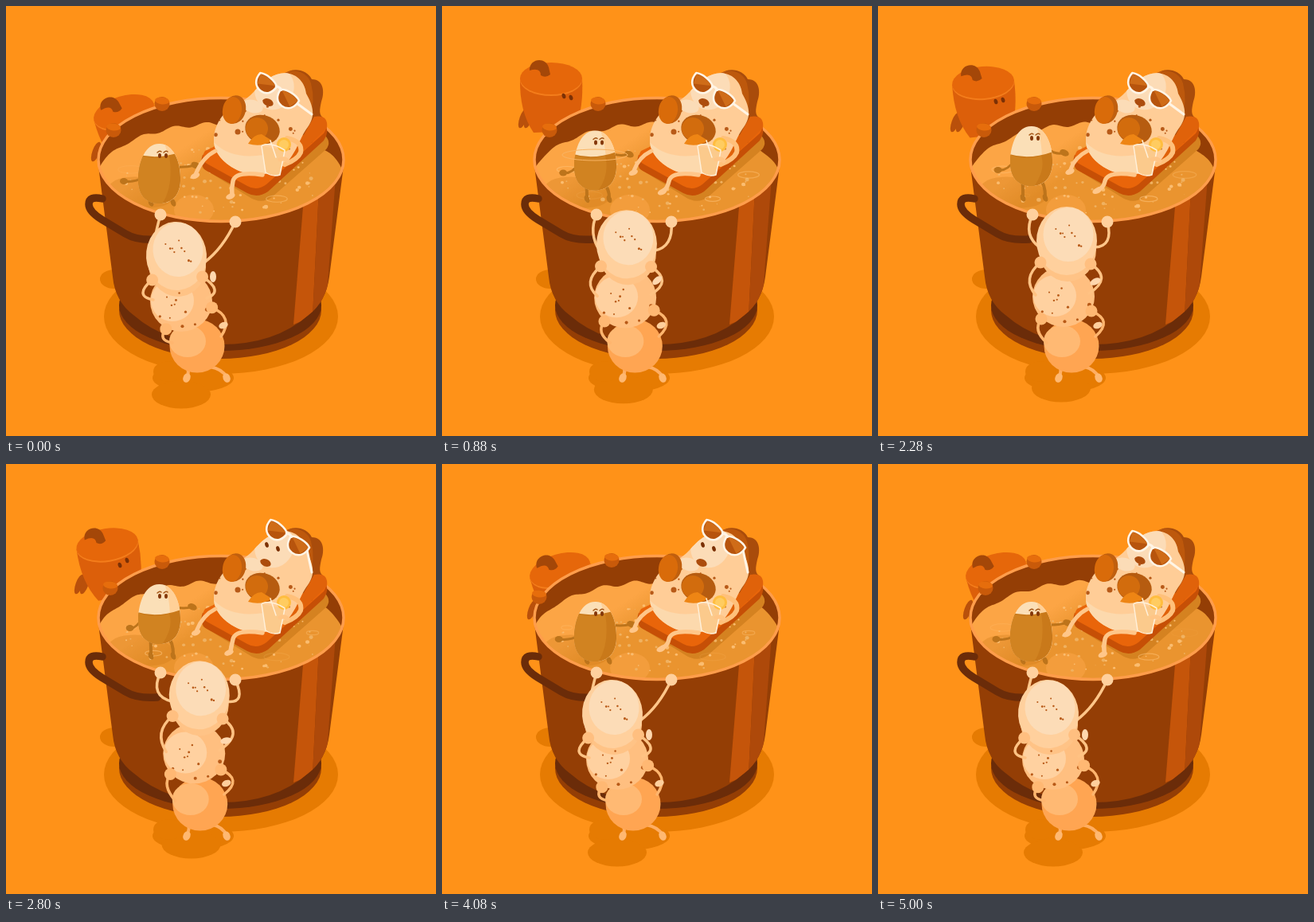
These frames come from a looping animation (540 px wide and 540 px high, 5040 ms). An HTML page with a canvas:

```html
<!DOCTYPE html>
<html>
<head>
<meta charset="utf-8">
<style>
html, body { margin: 0; width: 100%; height: 100%; overflow: hidden; background: #ff9218; }
canvas { display: block; width: 540px; height: 540px; }
</style>
</head>
<body>
<canvas id="stage" width="540" height="540"></canvas>
<script>
const ctx = document.getElementById('stage').getContext('2d');
const LOOP = 5040, STEP = 40, TAU = Math.PI * 2;
const FLOOR = '#ff9218', SHADOW = '#e67b02', WALL = '#943e05', DARK = '#6b2c09';
const CREAM = '#fcdcb7', SKIN = '#ffcd97', LIMB = '#ffc689', INK = '#7b3005', WHITE = '#fff5e6';

const mix = (a, b, k) => a + (b - a) * k;

// Smooth 0 to 1 between two times
function ramp(t, from, to) {
  const k = Math.min(1, Math.max(0, (t - from) / (to - from)));
  return k * k * (3 - 2 * k);
}

function seeded(seed) {
  return () => (seed = (seed * 16807) % 2147483647) / 2147483647;
}

function oval(x, y, rx, ry, color, rot = 0) {
  ctx.beginPath();
  ctx.ellipse(x, y, rx, ry, rot, 0, TAU);
  ctx.fillStyle = color;
  ctx.fill();
}

function ring(x, y, rx, ry, color, width) {
  ctx.beginPath();
  ctx.ellipse(x, y, rx, ry, 0, 0, TAU);
  ctx.strokeStyle = color;
  ctx.lineWidth = width;
  ctx.stroke();
}

function shape(d, color) {
  ctx.fillStyle = color;
  ctx.fill(new Path2D(d));
}

function line(d, color, width) {
  ctx.strokeStyle = color;
  ctx.lineWidth = width;
  ctx.stroke(new Path2D(d));
}

function curve(x0, y0, cx, cy, x1, y1, color, width) {
  line(`M${x0} ${y0}Q${cx} ${cy} ${x1} ${y1}`, color, width);
}

function within(path, draw) {
  ctx.save();
  ctx.clip(path);
  draw();
  ctx.restore();
}

function local(x, y, rot, draw) {
  ctx.save();
  ctx.translate(x, y);
  ctx.rotate(rot);
  draw();
  ctx.restore();
}

function speckle(x, y, rx, ry, count, seed) {
  const rnd = seeded(seed);
  for (let i = 0; i < count; i++) {
    const a = rnd() * TAU, far = Math.sqrt(rnd()), r = 1 + 1.5 * rnd() ** 2;
    oval(x + rx * far * Math.cos(a), y + ry * far * Math.sin(a), r, r, '#b85a18');
  }
}

const potMouth = new Path2D();
potMouth.ellipse(270, 193, 154, 77.5, 0, 0, TAU);

// How far each character is through its moves at time t
function moves(t) {
  const duck = ramp(t, 2900, 3260);
  return {
    climb: 0.78 * ramp(t, 120, 800) + 0.22 * ramp(t, 880, 1500) + 0.25 * ramp(t, 2300, 2700) - 1.25 * ramp(t, 2900, 3240),
    peek: ramp(t, 60, 640) - duck,
    lean: 0.5 * ramp(t, 900, 1500) + 0.5 * ramp(t, 2280, 2640) - duck,
    grip: duck - ramp(t, 4200, 4600),
    rise: 0.75 * ramp(t, 60, 620) + 0.25 * ramp(t, 900, 1500) - duck,
    lift: ramp(t, 2400, 2720) - ramp(t, 4320, 4720)
  };
}

function pumpkin(t, { peek, lean }) {
  const x = 148 - 11 * peek - 10 * lean, y = 133 - 42 * peek + 10 * lean;
  for (const dx of [-35, -28]) oval(x + dx, y + 50, 4.5, 13, '#b9500b', 0.35);
  local(x, y, 0.28 * peek - 0.28 - 0.16 * lean, () => {
    shape('M-39 0Q-40 42-22 68L30 66Q41 36 39 0Z', '#dc5f0a');
    oval(0, 2, 39, 20, '#f47d1b');
    oval(0, 0, 39, 20, '#e6670a');
    shape('M-27-10C-28-25-7-28-3-14L-1-5Q-7 0-13-4Q-13-14-27-10Z', '#a44708');
  });
  if (peek < 0.5) return;
  const blink = t > 1600 && t < 1880;
  for (const side of [-1, 1]) {
    oval(x + 20.5 + 4.5 * side, y + 23 + side * (1 - 4 * lean), blink ? 4 : 2.3, blink ? 1 : 3.4, INK, -0.3);
  }
}

function pumpkinHand(x, y) {
  oval(x, y, 9.5, 9, '#c95a0a');
  oval(x, y - 4, 9, 4.5, '#e66d0c', 0.1);
}

function pot() {
  oval(269, 382, 127, 61, WALL);
  oval(269, 376, 127, 57, DARK);
  const body = new Path2D('M115 193L134 340Q137 371 160 388Q202 425 270 425Q338 425 380 388Q402 371 406 340L425 193Z');
  ctx.fillStyle = WALL;
  ctx.fill(body);
  within(body, () => {
    shape('M374 240L393 230L385 390L361 400Z', '#c5550a');
    shape('M393 230L414 215L402 375L385 390Z', '#ae490a');
  });
  line('M121 242Q104 238 104 249Q104 258 120 268L150 286Q165 295 190 293', DARK, 9.5);
  ctx.fillStyle = WALL;
  ctx.fill(potMouth);
}

function soup(t) {
  ctx.beginPath();
  ctx.moveTo(113, 280);
  for (let x = 113; x <= 425; x += 2) {
    const bulge = Math.sqrt(Math.max(0, 1 - ((x - 269) / 156) ** 2));
    ctx.lineTo(x, 219 - bulge * (71 + 2.6 * Math.sin(x / 6.4 + t / LOOP * TAU * 4)));
  }
  ctx.lineTo(425, 280);
  const tone = ctx.createLinearGradient(190, 160, 250, 250);
  tone.addColorStop(0.3, '#fca545');
  tone.addColorStop(0.65, '#ea942f');
  ctx.fillStyle = tone;
  ctx.fill();
  oval(170, 234, 42, 19, 'rgba(201,120,22,.3)', 0.12);
  shape('M246 203L304 239Q320 250 334 240L402 180Q410 170 398 160Z', '#d58220');
  oval(236, 256, 25, 19, 'rgba(255,171,82,.4)');
}

function bubbles(t) {
  const rnd = seeded(4217);
  for (let i = 0; i < 110; i++) {
    const a = rnd() * TAU, far = Math.sqrt(rnd()), life = (t / LOOP * 3 + rnd()) % 1;
    const size = (0.9 + 1.9 * rnd() ** 2) * Math.min(1, 2.6 * Math.sin(life * Math.PI));
    oval(276 + 128 * far * Math.cos(a), 221 + 41 * far * Math.sin(a) - 3 * life, size, size * 0.9, i % 2 ? '#fbbd70' : '#f0b160');
  }
  for (let i = 0; i < 5; i++) {
    const turn = t / LOOP * 4 + i * 0.23, life = turn % 1, a = i * 2.4;
    ctx.globalAlpha = Math.sin(life * Math.PI) * 0.55;
    ring(270 + 115 * Math.cos(a), 212 + 38 * Math.sin(a), 5 + 12 * life, 2 + 3 * life, '#ffc57c', 1.2);
  }
  ctx.globalAlpha = 1;
}

function egg(t, { rise }) {
  const x = 192, y = 210 - 22 * rise, level = 188, limb = '#bd741b';
  const paddle = 3 * Math.sin(t / LOOP * TAU * 3);
  const lx = 148 + 5 * rise - paddle, ly = 220 - 14 * rise, rx = 238 - 4 * rise, ry = 200 - 18 * rise + paddle;
  curve(x - 20, y + 5, x - 30, ly + 2, lx, ly, limb, 3);
  curve(x + 22, y - 8, x + 32, ry + 3, rx, ry, limb, 3);
  oval(lx, ly, 5, 4, limb);
  oval(rx, ry, 6, 4, limb, 0.4);
  for (const side of [-1, 1]) {
    const foot = x + side * 14 + 4;
    curve(x + side * 11, y + 29, foot, y + 36, foot, 245 - 6 * rise, limb, 4);
    oval(foot, 247 - 6 * rise, 3, 5, limb, -0.4);
  }
  local(x, y, 0, () => {
    const shell = new Path2D('M0-37C18-38 27-14 27 5C28 28 16 38 0 38C-17 38-27 26-26 5C-25-15-17-37 0-37Z');
    const cut = level - y;
    within(shell, () => {
      ctx.fillStyle = '#fbdfb7';
      ctx.fillRect(-35, -45, 70, 90);
      shape('M6-40Q20-5 9 40H40V-40Z', '#ffd097');
      shape(`M-35 ${cut - 5}Q-4 ${cut + 9} 35 ${cut - 8}V50H-35Z`, '#c9791a');
      shape(`M-35 ${cut - 5}Q-8 ${cut + 8} 13 ${cut}Q19 18 3 40H-35Z`, '#d18321');
    });
    for (const dx of [1, 9]) {
      oval(dx, -22, 2, 3, '#843708');
      line(`M${dx - 3}-26q3-3 5-1`, '#a75a1b', 1.5);
    }
  });
  const wake = Math.sin(rise * Math.PI);
  if (wake > 0.3) ring(x, level - 1, 34 + 10 * wake, 7, '#f8b464', 1);
}

function shades(x, y) {
  line(`M${x + 26} ${y + 14}L384 136`, WHITE, 3);
  local(x, y, 0.62, () => {
    for (const side of [-1, 1]) {
      ctx.save();
      ctx.translate(17 * side, 0);
      ctx.scale(-side, 1);
      const lens = 'M-13-8C-6-12 8-11 14-6C14 4 9 10 1 10C-9 10-14 2-13-8Z';
      shape(lens, '#b7540d');
      shape('M-12-7Q0-11 12-6L-8 5Z', '#cf6c18');
      line(lens, WHITE, 2.6);
      ctx.restore();
    }
    line('M-4-6Q0-8 4-6', WHITE, 3);
  });
}

function lounger(t, { lift }) {
  const kick = Math.sin((t - 220) / LOOP * TAU * 3);

  shape('M247 187Q242 201 252 207L303 235Q316 242 329 233L399 169Q407 158 400 146Z', '#c64f06');
  shape('M250 182Q243 193 254 199L303 226Q315 233 327 224L399 160Q407 147 397 139L365 127Z', '#e9650a');
  shape('M349 86C360 76 378 80 384 92C400 92 400 110 396 120C394 130 392 137 400 142L384 172L360 150Z', '#a94c0b');
  shape('M350 84C362 78 379 83 383 97Q389 120 381 143Q377 102 350 84Z', '#bd580c');
  shape('M387 139Q405 136 403 153L365 190L352 200Z', '#e0620a');

  const body = new Path2D('M330 91C350 77 374 86 377 110C386 126 389 138 379 152C368 166 364 190 345 203C325 216 300 213 283 202C268 192 260 180 261 166C262 147 275 130 292 121C309 116 313 101 330 91Z');
  ctx.fillStyle = SKIN;
  ctx.fill(body);
  within(body, () => {
    oval(337, 104, 24, 27, CREAM, 0.5);
    shape('M258 168Q285 200 345 182V220H258Z', '#fcd9ad');
    speckle(318, 160, 55, 42, 24, 77);
  });
  oval(310, 126, 13, 8, '#fbdcb7', 0.3);
  oval(287, 130, 14, 18, '#c05f0e', 0.25);
  oval(284, 131, 12, 17, '#d96b0a', 0.15);
  oval(322, 155, 22, 18, '#b65c10', 0.28);
  oval(315, 154, 14, 14, '#d26c0d', 0.5);
  shape('M304 173Q311 161 321 161L334 169Q321 178 304 173Z', '#ee8514');
  oval(291, 158, 3.5, 3.5, '#b85a18');

  const fx = 240 + 2 * kick, fy = 211 - 3 * kick, hx = 279 - 4 * kick, hy = 236 - 4 * kick;
  curve(263, 182, 247, 190, fx, fy - 3, LIMB, 5);
  oval(fx - 1, fy, 6, 3.5, LIMB, -0.4);
  line(`M322 212Q288 207 285 220Q283 229 ${hx + 2} ${hy - 2}`, LIMB, 5.5);
  oval(hx, hy, 6, 3.5, LIMB, -0.4);

  line('M353 166Q373 170 370 184Q366 193 350 199', '#ffc07a', 6);
  shape('M321 176L350 181L344 213Q334 214 326 209Z', '#fbca8c');
  oval(349, 174, 9, 9, '#ffbd3f');
  oval(349, 174, 6, 6, '#ffcc60');
  line('M321 176L326 209Q335 215 344 212L350 182M322 175Q334 171 350 181M339 190L332 169', '#fff0d9', 1.5);
  curve(344, 193, 350, 190, 354, 195, '#ffc586', 5);

  const gx = mix(339, 352, lift), gy = mix(108, 94, lift);
  if (lift > 0.3) {
    for (const side of [-1, 1]) oval(334.5 + 7 * side, 104 + 2.5 * side, 2.2, 3.5, INK, -0.3);
  }
  oval(mix(329, 326, lift), mix(121, 124, lift), 7, 4.5, '#ac4c0d', 0.4);
  shades(gx, gy);
}

function floorShadow({ climb }) {
  oval(270, 390, 147, 72, SHADOW);
  oval(136, 343, 18, 12, SHADOW);
  oval(235, 467, 51, 18, SHADOW);
  oval(220 + 10 * climb, 488 - 8 * climb, 37, 17.5, SHADOW);
  oval(204, 459, 19, 13, SHADOW);
}

// A point fixed to a body that tilts around its centre
function attach(x, y, dx, dy, rot) {
  const c = Math.cos(rot), s = Math.sin(rot);
  return [x + dx * c - dy * s, y + dx * s + dy * c];
}

function beans({ climb }) {
  const hx = 214 + 23 * climb, hy = 314 - 19 * climb;
  const mx = 220 + 13 * climb, my = 371 - 6 * climb;
  const bx = 240 + 3 * climb, by = 427, sway = 0.28 * (climb - 1);
  const [ax, ay] = attach(hx, hy, -33, 27, sway / 3);
  const [cx, cy] = attach(hx, hy, 30, 29, sway / 3);
  const [dx, dy] = attach(mx, my, -28, 28, sway);
  const [ex, ey] = attach(mx, my, 35, 18, sway);

  for (const [x, side] of [[227, -1], [277, 1]]) {
    curve(bx + side * 16, by + 26, x - side * 5, 456, x, 466, '#ffae62', 4);
    oval(x, 467, 4.5, 6, '#ffb871', -0.4 * side);
  }
  oval(bx, by, 34.5, 33.5, '#ffa552');
  oval(bx - 12, by - 6, 23, 20, '#ffb973');
  curve(dx, dy, dx - 11, dy + 14, bx - 31, by - 4, '#ffb56e', 3.5);
  curve(ex, ey, ex + 28, ey + 12, bx + 30, by - 12, '#ffb56e', 3.5);
  oval(bx + 33, by - 26, 6, 4, '#ffcf9c', -0.4);

  oval(mx, my, 39, 38, '#ffbf80');
  oval(mx - 11, my - 1, 27, 26, '#ffd1a0');
  oval(hx + 1, hy + 11, 36, 40, '#ffc386', sway / 2);
  speckle(mx, my + 10, 34, 24, 11, 311);
  for (const [x, y] of [[dx, dy], [ex, ey]]) oval(x, y, 7.5, 7.5, '#ffb873');

  curve(ax, ay, ax - 24, ay + 20, mx - 35, my - 2, '#ffc283', 3.5);
  curve(cx, cy, cx + 28, cy + 18, mx + 32, my - 4, '#ffc283', 3.5);
  oval(mx + 40, my - 31 + 12 * climb, 4, 7, '#ffd7ae', 1.1 * climb);

  curve(194, 262, 190 - 8 * climb, 276 + 12 * climb, hx - 34, hy + 8, LIMB, 3.5);
  curve(288, 271, 272 + 24 * climb, 305 - 3 * climb, hx + 35, hy + 8, LIMB, 3.5);
  oval(hx, hy, 38, 43, '#ffd09d', sway / 4);
  oval(hx + 2, hy - 8, 31.5, 34, CREAM, sway / 4);
  speckle(hx + 2, hy - 6, 9, 6, 4, 52);
  speckle(hx, hy + 6, 33, 28, 5, 907);
  for (const [x, y] of [[ax, ay], [cx, cy]]) oval(x, y, 7.5, 7.5, '#ffbf80');
  oval(194, 262, 7.5, 7.5, '#ffd09d');
  oval(288, 271, 7.5, 7.5, '#ffd09d');
}

function draw(t) {
  const m = moves(t);
  ctx.fillStyle = FLOOR;
  ctx.fillRect(0, 0, 540, 540);
  floorShadow(m);
  pumpkin(t, m);
  pot();
  within(potMouth, () => {
    soup(t);
    bubbles(t);
    egg(t, m);
  });
  ring(270, 193, 154, 77.5, '#ff9d4b', 3.5);
  pumpkinHand(196 + 17 * m.grip, 123 - 2 * m.grip);
  pumpkinHand(135 - 4 * m.lean - 13 * m.grip, 156 + 11 * m.grip);
  lounger(t, m);
  beans(m);
}

ctx.lineCap = ctx.lineJoin = 'round';
const start = performance.now();
function tick() {
  const t = (performance.now() - start) % LOOP;
  draw(Math.floor(t / STEP) * STEP);
  requestAnimationFrame(tick);
}
tick();
</script>
</body>
</html>
```
